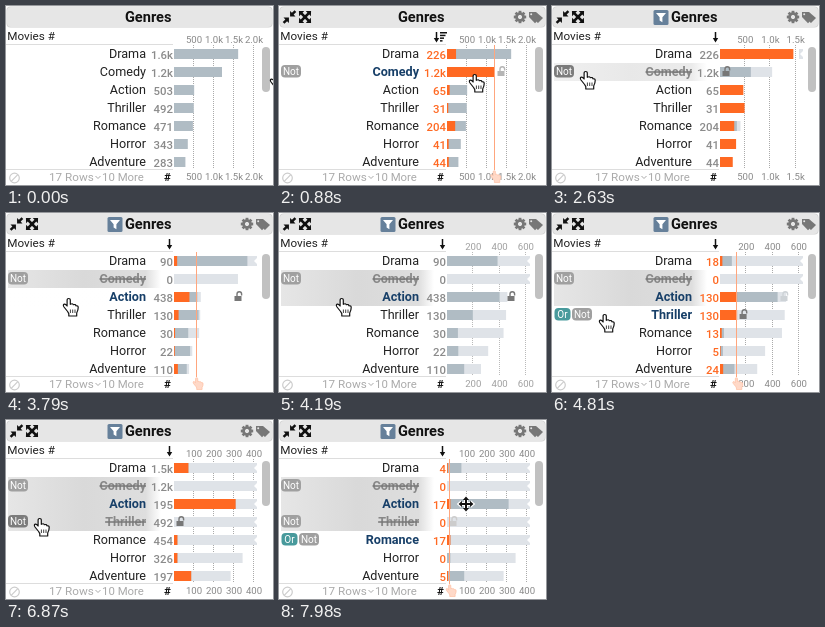
An HTML page with a canvas that plays this animation: 267x179 px, repeating every 8 s.

```html
<!DOCTYPE html>
<html lang="en">
<head>
<meta charset="utf-8">
<title>Genres</title>
<style>
html, body { margin: 0; width: 100%; height: 100%; overflow: hidden; background: #fff; }
canvas { display: block; width: 267px; height: 179px; }
</style>
</head>
<body>
<canvas id="stage"></canvas>
<script>
const W = 267, H = 179, LOOP = 8000, X0 = 168, XMAX = 251;
const canvas = document.getElementById('stage');
const dpr = window.devicePixelRatio || 1;
canvas.width = W * dpr;
canvas.height = H * dpr;
const c = canvas.getContext('2d');

const ORANGE = '#ff6922', NAVY = '#173f68', BAR = '#b0bcc4', PALE = '#dfe3e8';
const names = ['Drama', 'Comedy', 'Action', 'Thriller', 'Romance', 'Horror', 'Adventure'];
const minus = (a, b) => a.map((v, i) => v - b[i]);
const none = names.map(() => 0);
const all = [1603, 1200, 503, 492, 471, 343, 283];
const comedy = [226, 1200, 65, 31, 204, 41, 44];
const notComedy = minus(all, comedy);
const action = [90, 0, 438, 130, 30, 22, 110];
const thriller = [18, 0, 130, 130, 13, 5, 24];
const notThriller = minus(action, thriller);
const romance = [4, 0, 17, 0, 17, 0, 5];

const clamp = v => Math.max(0, Math.min(1, v));
const out = p => 1 - (1 - p) ** 3;
const inOut = p => p < .5 ? 4 * p ** 3 : 1 - 4 * (1 - p) ** 3;
const smooth = p => p * p * (3 - 2 * p);
const mix = (a, b, p) => Array.isArray(a) ? a.map((v, i) => mix(v, b[i], p)) : a + (b - a) * p;
const within = (t, a, b) => t >= a && t < b;

// Each step is [start, duration, value]
function track(t, value, steps, ease = out) {
  for (const [start, span, next] of steps) {
    if (t < start) break;
    value = mix(value, next, ease(span ? clamp((t - start) / span) : 1));
  }
  return value;
}
const latest = (t, list) => list.filter(e => t >= e[0]).pop();

const scales = span => [[2390, span, .0533], [3790, span, .1315], [6150, span, .2]];
const activeSteps = [[2390, 550, notComedy], [3790, 600, action], [6150, 550, notThriller]];
const previewSteps = [
  [250, 560, comedy], [1560, 540, notComedy], [2760, 280, none],
  [3050, 480, action], [3790, 0, action.map(v => v * .65)], [3791, 300, none],
  [4450, 300, thriller], [5060, 310, notThriller], [7470, 90, none], [7570, 360, romance]
];
const counts = [
  [0, all], [250, comedy, 1], [1690, comedy], [2760, notComedy], [3050, action, 1],
  [3790, action], [4450, thriller, 1], [5060, thriller], [6150, minus(all, notThriller)],
  [7470, notThriller], [7570, romance, 1]
];
const path = [
  [0, 270, 68], [60, 270, 68], [820, 196, 69], [880, 196, 69], [1630, 36, 69],
  [2100, 34, 66], [2700, 34, 66], [3140, 60, 80], [3550, 63, 86], [4280, 63, 86],
  [4590, 56, 103], [4810, 53, 102], [5380, 35, 91], [5730, 35, 91], [5850, 32, 89],
  [6150, 32, 89], [6400, 34, 99], [7470, 34, 99], [7620, 60, 113], [7980, 187, 84], [8000, 187, 84]
];

function text(s, x, y, size, color, align = 'left', weight = 400) {
  c.font = `${weight} ${size}px Roboto, sans-serif`;
  c.textAlign = align;
  c.fillStyle = color;
  c.fillText(s, x, y);
  return c.measureText(s).width;
}
function box(x, y, w, h, r, color) {
  c.fillStyle = color;
  c.beginPath();
  c.roundRect(x, y, w, h, r);
  c.fill();
}
function rect(x, y, w, h, color) {
  c.fillStyle = color;
  c.fillRect(x, y, w, h);
}
function poly(points, color) {
  c.fillStyle = color;
  c.beginPath();
  points.forEach(([x, y]) => c.lineTo(x, y));
  c.closePath();
  c.fill();
}
function line(x1, y1, x2, y2, color, width = 1) {
  c.strokeStyle = color;
  c.lineWidth = width;
  c.beginPath();
  c.moveTo(x1, y1);
  c.lineTo(x2, y2);
  c.stroke();
}
function at(x, y, draw, scale = 1, turn = 0) {
  c.save();
  c.translate(x, y);
  c.rotate(turn);
  c.scale(scale, scale);
  draw();
  c.restore();
}
const short = v => v >= 1000 ? (v / 1000).toFixed(1) + 'k' : String(Math.round(v));
const rowTop = i => 39 + 18 * i;
const snap = x => Math.round(x) - .5;

const handPath = new Path2D('M-1.4 12.5L-5 8Q-6.4 5.6-4.7 5.2Q-3.3 5-1.9 7V1.2Q-1.9-.5-.3-.5Q1.3-.5 1.3 1.2V5.3Q3.7 4 4.3 5.7Q6.5 5 7 6.8Q9.2 6.4 9.2 8.6Q9.2 11.5 7.7 14V17H-.2V14.6Z');
function hand() {
  c.fillStyle = '#fff';
  c.fill(handPath);
  c.strokeStyle = '#111';
  c.lineWidth = 1.2;
  c.lineJoin = 'round';
  c.stroke(handPath);
  for (const x of [1.4, 3.7, 6]) line(x, 10.5, x, 14, '#111', .8);
}
function cross(size, color, stem = 1) {
  for (let i = 0; i < 4; i++) at(0, 0, () => {
    poly([[-stem, 0], [-stem, -size * .55], [-size * .42, -size * .55], [0, -size],
      [size * .42, -size * .55], [stem, -size * .55], [stem, 0]], color);
  }, 1, i * Math.PI / 2);
}
function moveCursor() {
  cross(9.2, '#fff', 2);
  cross(7.4, '#111');
}
function lock(x, y, color) {
  rect(x - 3.5, y, 7, 5, color);
  c.strokeStyle = color;
  c.lineWidth = 1.4;
  c.beginPath();
  c.moveTo(x - 1, y);
  c.lineTo(x - 1, y - 2);
  c.arc(x + 1.3, y - 2, 2.3, Math.PI, 0);
  c.lineTo(x + 3.6, y - .5);
  c.stroke();
}
function button(label, x, y, w, color) {
  box(x, y + 2, w, 12.5, 4, color);
  text(label, x + w / 2, y + 12, 10, '#fff', 'center');
}

function header(t) {
  box(.5, .5, 266, 21, 4, '#cfcfcf');
  box(1, 1, 265, 20, 4, '#e6e6e6');
  text('Genres', 142.2, 16, 14.6, '#111', 'center', 700);
  text('Movies #', 1.3, 34, 11.7, '#222');
  if (t < 150) return;
  for (const turn of [0, Math.PI]) at(10.5, 11, () => {
    poly([[.5, -.5], [.5, -5.2], [2.1, -3.6], [4.4, -5.9], [5.9, -4.4], [3.6, -2.1], [5.2, -.5]], '#111');
  }, 1.15, turn);
  at(26, 11, () => cross(8.6, '#111', 1.3), 1, Math.PI / 4);
  at(241, 11, () => {
    for (let i = 0; i < 8; i++) at(0, 0, () => rect(-1.4, -6.2, 2.8, 4, '#777'), 1, i * Math.PI / 4);
    c.strokeStyle = '#777';
    c.lineWidth = 2.6;
    c.beginPath();
    c.arc(0, 0, 3.5, 0, 7);
    c.stroke();
  });
  poly([[253, 6], [257, 6], [264, 12], [259, 17], [258, 16.3]], '#777');
  poly([[250, 6], [254.5, 6], [261, 12.2], [256, 17.2], [250, 11]], '#777');
  box(251.2, 7.2, 2, 2, 1, '#e6e6e6');

  const filtered = t >= 2390, sx = filtered ? 163.5 : 157.5;
  line(sx, 26, sx, 35, '#111', 1.5);
  poly([[sx - 2.7, 32], [sx + 2.7, 32], [sx, 36.5]], '#111');
  if (!filtered) [7, 5.5, 4, 2.5].forEach((w, i) => rect(161, 26 + i * 2.7, w, 1.5, '#111'));
  else {
    box(101.5, 4, 15, 15, 1.5, '#66809a');
    poly([[104, 7], [114, 7], [110.4, 11.2], [110.4, 16.3], [107.6, 14.5], [107.6, 11.2]], '#fff');
  }
}

function axis(t) {
  const scale = track(t, .04, scales(600));
  const shown = t < 3790 ? scale : t < 6150 ? .1315 : .2;
  const step = t < 3790 ? 500 : t < 6150 ? 200 : 100;
  const fade = t < 3790 ? 1 : clamp((t - (t < 6150 ? 3790 : 6150)) / 500);
  c.globalAlpha = fade;
  for (let v = step; X0 + v * shown <= 250; v += step) {
    const x = X0 + v * shown;
    c.setLineDash([1, 1]);
    line(snap(x), 39, snap(x), 163, '#aaa');
    c.setLineDash([]);
    text(short(v), x, 36.5, 9.6, '#888', 'center');
    text(short(v), x, 174, 9.6, '#888', 'center');
  }
  c.globalAlpha = 1;
}

// "picked" is the time at which the row joins the filter
function rowLook(i, t) {
  const look = { hot: false, struck: false, picked: Infinity };
  if (i === 1) {
    look.hot = within(t, 250, 2390);
    look.struck = t >= 2390;
    look.picked = 2390;
  }
  if (i === 2) {
    look.hot = t >= 3050;
    look.picked = 3790;
  }
  if (i === 3) {
    look.hot = within(t, 4400, 6150);
    look.struck = t >= 6150;
    look.picked = 6150;
  }
  if (i === 4) look.hot = t >= 7570;
  return look;
}

function rows(t) {
  const totalScale = track(t, .04, scales(600), inOut);
  const barScale = track(t, .04, scales(270));
  const active = track(t, all, activeSteps, smooth);
  const preview = track(t, none, previewSteps);
  const [, values, bright] = latest(t, counts);
  const shade = c.createLinearGradient(2, 0, 155, 0);
  shade.addColorStop(0, '#e6e6e6');
  shade.addColorStop(.5, '#d9d9d9');
  shade.addColorStop(.9, '#dedede');
  shade.addColorStop(1, '#dedede00');

  names.forEach((name, i) => {
    const y = rowTop(i), look = rowLook(i, t);
    c.globalAlpha = clamp((t - look.picked) / 400);
    rect(2, y, 153, 18, shade);
    c.globalAlpha = 1;
    const strong = look.hot || look.struck;
    const color = look.struck ? '#888' : look.hot ? NAVY : '#222';
    const w = text(name, 140, y + 13, 12.6, color, 'right', strong ? 700 : 400);
    if (look.struck) line(140 - w, y + 9, 140, y + 9, '#777', 1.3);
    text(short(values[i]), 167, y + 13.5, 11.4, bright ? ORANGE : '#8b8b8b', 'right', 500);

    const bar = (v, scale, fill) => rect(X0, y + 4, Math.min(v * scale, XMAX - X0), 10, fill);
    bar(all[i], totalScale, PALE);
    bar(active[i], totalScale, BAR);
    bar(preview[i], barScale, ORANGE);
    if (X0 + all[i] * barScale > XMAX) {
      rect(XMAX - 4, y + 4, 4, 10, PALE);
      poly([[XMAX + 1, y + 5], [XMAX + 1, y + 13], [XMAX - 3, y + 9]], '#fff');
    }
  });

  const lockX = i => X0 + active[i] * totalScale + 6;
  if (within(t, 250, 2760)) lock(t < 2390 ? lockX(1) : 174, 65, t < 2390 ? '#b5b5b5' : '#777');
  if (within(t, 3050, 6150)) lock(t < 3790 ? lockX(2) : 232, 83, t < 4400 ? '#777' : '#cdd2d6');
  if (t >= 4400) lock(t < 6150 ? lockX(3) : 174, 101, t < 7470 ? '#777' : '#ccc');

  const rest = '#a0a0a0', dark = '#7c7c7c';
  const not = (i, color) => button('Not', 2, rowTop(i), 20, color);
  const pair = (i, color) => {
    button('Or', 2.5, rowTop(i), 16, '#489a9c');
    button('Not', 20, rowTop(i), 20, color);
  };
  if (t >= 250) not(1, within(t, 1690, 2760) ? dark : rest);
  if (within(t, 3050, 3790)) not(2, rest);
  if (within(t, 4400, 6150)) pair(3, t >= 5060 ? dark : rest);
  if (t >= 6150) not(3, t < 7470 ? dark : rest);
  if (t >= 7570) pair(4, rest);
}

// Guide line for the value under the pointer
function guide(t) {
  const spans = [[250, 1560, 1200, .04], [3050, 3990, 438, .0533], [4450, 5060, 130, .1315], [7570, LOOP, 17, .2]];
  for (const [start, end, value, scale] of spans) {
    if (!within(t, start, end)) continue;
    const x = X0 + value * scale;
    c.globalAlpha = clamp((t - start) / 200) * clamp((end - t) / 150 + (end === LOOP ? 1 : 0));
    line(snap(x), 39, snap(x), 164, '#ffa67d');
    at(x - .5, 165, () => {
      c.fillStyle = '#ffd9c8';
      c.fill(handPath);
      c.strokeStyle = '#ffbd9f';
      c.lineWidth = 1;
      c.stroke(handPath);
    }, .68);
    c.globalAlpha = 1;
  }
}

function footer() {
  line(0, 38.5, 167, 38.5, '#ddd');
  line(0, 163.5, 167, 163.5, '#ddd');
  c.strokeStyle = '#ccc';
  c.lineWidth = 1.2;
  c.beginPath();
  c.arc(8.5, 172, 4.8, 0, 7);
  c.stroke();
  line(5.2, 175.4, 11.8, 168.6, '#ccc', 1.2);
  text('17 Rows', 43, 175, 11.7, '#aaa');
  line(89.5, 170, 92, 172.5, '#aaa');
  line(92, 172.5, 94.5, 170, '#aaa');
  text('10 More', 96, 175, 11.4, '#aaa');
  text('#', 161.5, 175, 11.5, '#111', 'center', 700);
  box(256, 41, 8, 45, 4, '#c1c1c1');
}

function pointer(t) {
  let i = 0;
  while (i < path.length - 2 && t >= path[i + 1][0]) i++;
  const [t0, x0, y0] = path[i], [t1, x1, y1] = path[i + 1];
  const e = smooth(clamp((t - t0) / (t1 - t0)));
  at(mix(x0, x1, e), mix(y0, y1, e), t >= 7940 ? moveCursor : hand);
}

function draw(t) {
  c.setTransform(dpr, 0, 0, dpr, 0, 0);
  rect(0, 0, W, H, '#fff');
  header(t);
  axis(t);
  rows(t);
  footer();
  guide(t);
  pointer(t);
}

const begin = performance.now();
function tick() {
  draw((performance.now() - begin) % LOOP);
  requestAnimationFrame(tick);
}
tick();
</script>
</body>
</html>
```
